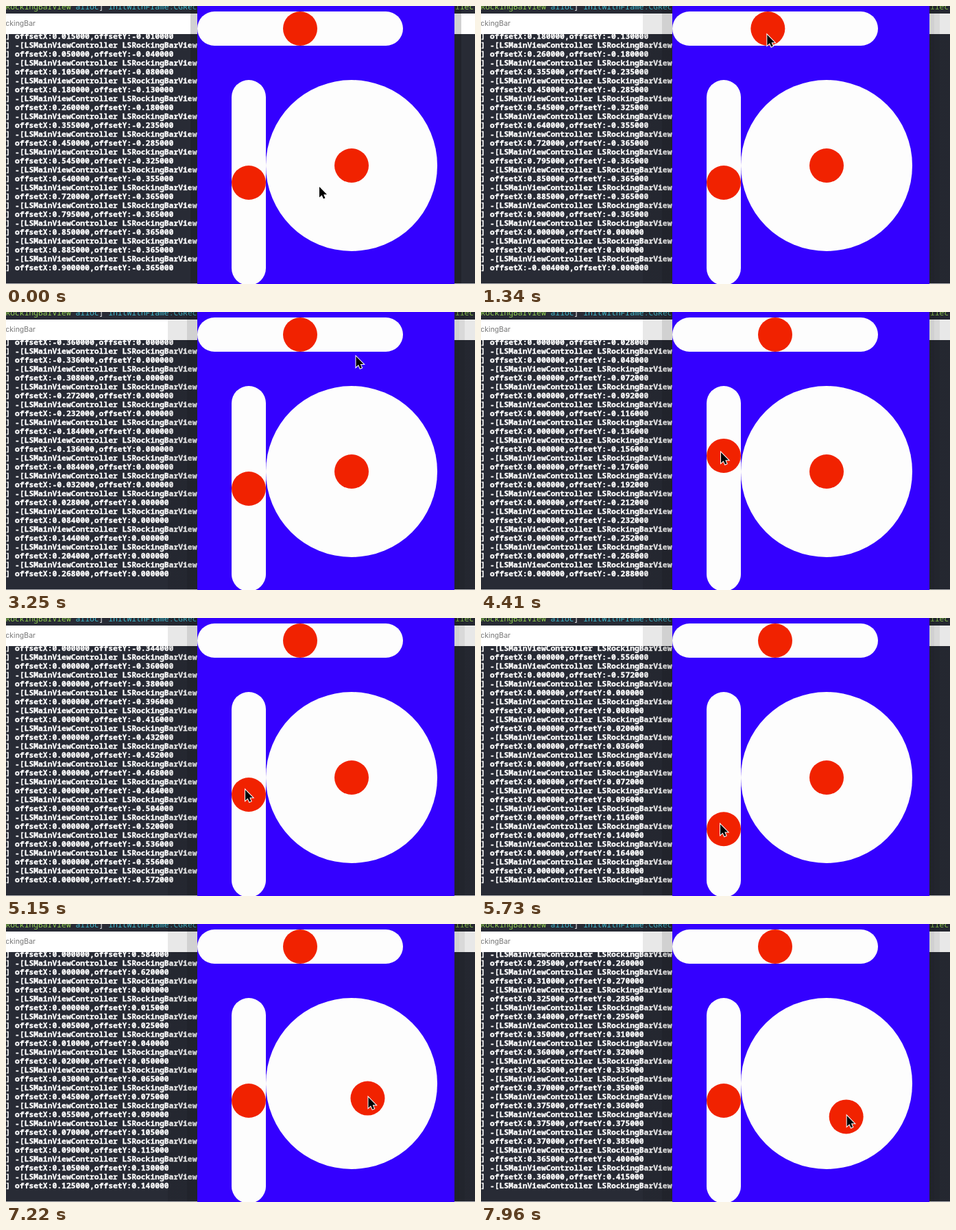
Animation, 684 px wide and 406 px high, one loop 8 s. Source, as an HTML page:

```html
<!DOCTYPE html>
<html lang="en">
<head>
<meta charset="utf-8">
<title>Rocking bar</title>
<style>
  html, body { margin: 0; width: 100%; height: 100%; overflow: hidden; background: #282b35; }
  #stage { position: relative; width: 684px; height: 406px; overflow: hidden; background: #282b35; }
  #stage > * { position: absolute; margin: 0; }
  pre { font: 11.35px/13px "Noto Sans Mono", "DejaVu Sans Mono", monospace; white-space: pre; }
  #log { left: -.6px; top: 37px; color: #fff; font-weight: 700; -webkit-text-stroke: .35px #fff; }
  .code { top: -6px; color: #fff; font-weight: 500; }
  .type { color: #93d34f; }
  .call { color: #3fbccf; }
  #title { left: 0; top: 11px; width: 684px; height: 30px; background: #fff; }
  #title span { position: absolute; right: 641px; font: 10.5px/30px Inter, "Liberation Sans", sans-serif; color: #777; }
  .shade { top: 0; height: 405px; }
  #idle { left: 269px; width: 395px; background: #0000002e; }
  #active { left: 236px; width: 448px; background:
    linear-gradient(90deg, #00000017 28px, #0000002e 28px 425px, #00000026 425px 433px, #00000017 433px); }
  #edge { left: 0; top: 405px; width: 684px; height: 1px; background: #b4b4b8; }
  svg { left: 0; top: 0; }
</style>
</head>
<body>
<div id="stage">
  <pre id="log"></pre>
  <pre class="code" style="left:-.6px"><span class="type">RockingBarView</span> <span class="call">alloc</span>] <span class="call">initWithFrame:CGRect</span></pre>
  <pre class="code type" style="left:655px">llec</pre>
  <div id="title"><span>ockingBar</span></div>
  <div id="idle" class="shade"></div>
  <div id="active" class="shade"></div>
  <div id="edge"></div>
  <svg width="684" height="406">
    <path fill="#3400ff" d="M279 0h375v406h-375z"/>
    <g fill="#fdfdfd">
      <rect x="279" y="8" width="300" height="50" rx="25"/>
      <rect x="329" y="108" width="50" height="300" rx="25"/>
      <circle cx="504" cy="233" r="125"/>
    </g>
    <g fill="#f12200">
      <circle id="across" cx="429" cy="33" r="25"/>
      <circle id="down" cx="354" cy="258" r="25"/>
      <circle id="stick" cx="504" cy="233" r="25"/>
    </g>
    <path id="cursor" stroke="#fff" stroke-width="2" paint-order="stroke"
      d="M0 0V15.5L3.6 12.2 6 17.6 8.5 16.5 6.2 11.2H11Z"/>
  </svg>
</div>
<script>
const $ = id => document.getElementById(id);
const clamp = (v, lo, hi) => Math.min(hi, Math.max(lo, v));
const smooth = u => u * u * (3 - 2 * u);

const LOOP = 8000, ROWS = 27;
const BAR = 125, STICK = 100;  // travel in pixels for an offset of 1
const RATE = 3.625;            // log entries per refresh

// Refreshes that fall between a header line and its offsets
const SPLIT = [38, 53];

// Times count screen refreshes; a path maps drag progress to an offset
const drags = [
  { knob: "stick", reach: STICK, grab: [367, 300.5], from: -7, to: 0, print: -10, count: 15,
    path: u => [.9 * smooth(u), -.365 * smooth(Math.min(1, 1.4 * u))] },
  { knob: "across", reach: BAR, grab: [428, 42], from: 5.7, to: 20.1, print: 7.31, count: 64,
    path: u => [u < .528 ? -.388 * smooth(u / .528) : -.388 + 1.204 * smooth((u - .528) / .472), 0] },
  { knob: "down", reach: BAR, grab: [350, 253], from: 24.5, to: 31.5, print: 25, count: 31,
    path: u => [0, -.572 * u ** .9] },
  { knob: "down", reach: BAR, grab: [349, 251], from: 34, to: 39.5, print: 35.1, count: 25,
    path: u => [0, .62 * u ** 1.36] },
  { knob: "stick", reach: STICK, grab: [505, 231.5], from: 44, to: 53.1, print: 45.24, count: 39, rate: 4.16,
    path: u => [.375 * smooth(1 - Math.abs(1.33 * u - 1)), .49 * u] },
];

const progress = (d, n) => (n - d.from) / (d.to - d.from);
const shift = (d, u) => d.path(u).map(v => v * d.reach);
const tip = (d, u) => shift(d, u).map((v, i) => v + d.grab[i]);

function cursorAt(n) {
  const i = drags.findLastIndex(d => n >= d.from);
  const d = drags[i], next = drags[i + 1];
  if (n < d.to) return tip(d, progress(d, n));
  const u = smooth((n - d.to) / (next.from - d.to));
  const goal = tip(next, 0);
  return tip(d, 1).map((v, j) => v + (goal[j] - v) * u);
}

// Offsets are reported in half pixels
function report(d, u) {
  const [x, y] = d.path(u).map(v => (Math.round(v * d.reach * 2) / d.reach / 2).toFixed(6));
  return `] offsetX:${x},offsetY:${y}`;
}

const HEADER = "] -[LSMainViewController LSRockingBarView";

function logAt(n) {
  const lines = [];
  for (const d of drags) {
    const printed = clamp(Math.floor((n - d.print) * (d.rate || RATE)) + 1, 0, d.count);
    for (let i = 0; i < printed; i++) lines.push(HEADER, report(d, i / (d.count - 1)));
  }
  if (SPLIT.includes(n)) lines.push(HEADER);
  return lines.slice(-ROWS).join("\n");
}

const move = (id, [x, y]) => $(id).setAttribute("transform", `translate(${x} ${y})`);

function draw(n) {
  $("log").textContent = logAt(n);
  $("idle").hidden = n > 0;
  $("active").hidden = n === 0;
  for (const id of ["across", "down", "stick"]) {
    const d = drags.find(d => d.knob === id && n >= d.from && n < d.to);
    move(id, d ? shift(d, progress(d, n)) : [0, 0]);
  }
  move("cursor", cursorAt(n));
}

// Refreshes come in groups of eight, the last of each held a little longer
function refreshAt(t) {
  if (t < 300) return 0;
  const group = Math.floor((t - 300) / 1176);
  const rest = (t - 300) % 1176;
  return 8 * group + 1 + Math.min(7, Math.floor(rest / 145));
}

const origin = performance.now();
let shown = -1;
function tick() {
  const n = refreshAt((performance.now() - origin) % LOOP);
  if (n !== shown) draw(shown = n);
  requestAnimationFrame(tick);
}
tick();
</script>
</body>
</html>
```
